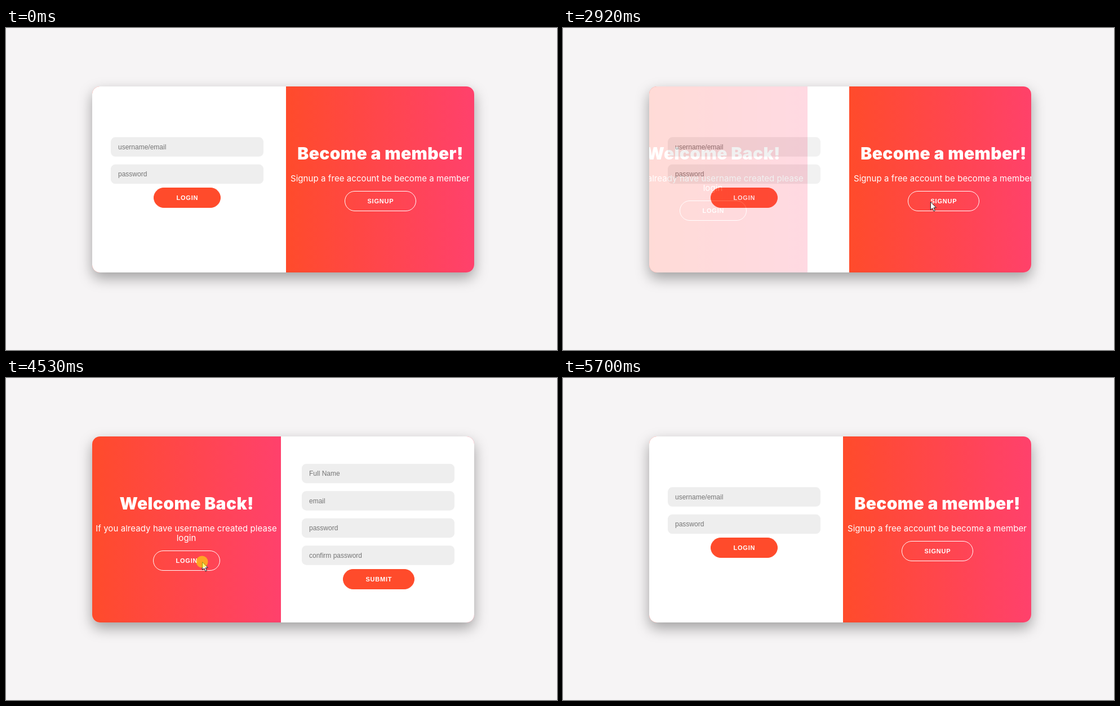
Recreate the animation shown at these times as an HTML page. Size 978x573 px, loop 6230 ms.

```html
<!DOCTYPE html>
<html lang="en">
<head>
<meta charset="utf-8">
<title>Login and signup</title>
<style>
  html, body { margin: 0; width: 100%; height: 100%; overflow: hidden; background: #f6f4f5; }
  .card {
    position: absolute; left: 153px; top: 104px; width: 678px; height: 331px;
    border-radius: 14px; background: #fff;
    box-shadow: 0 10px 25px rgba(0,0,0,.35);
  }
  svg { position: absolute; left: 0; top: 0; display: block; }
  text { fill: #fff; text-anchor: middle; }
  .title { font: 900 30px Inter, sans-serif; letter-spacing: .4px; }
  .info { font: 400 15px Inter, sans-serif; letter-spacing: .07px; }
  .label { font: 700 11px "Liberation Sans", Arial, sans-serif; letter-spacing: .8px; }
  .hint { font: 12px "Liberation Sans", Arial, sans-serif; fill: #757575; text-anchor: start; }
  .button { transform-box: fill-box; transform-origin: center; }
</style>
</head>
<body>
<div class="card"></div>
<svg width="978" height="573" viewBox="0 0 978 573">
  <defs>
    <linearGradient id="warm">
      <stop offset="0" stop-color="#ff4b2b"/>
      <stop offset="1" stop-color="#ff416c"/>
    </linearGradient>
    <clipPath id="frame"><rect x="153" y="104" width="678" height="331" rx="14"/></clipPath>
  </defs>
  <g id="scene" clip-path="url(#frame)"></g>
  <g id="cursor">
    <path d="M.5 .5V14.6L3.7 11.6L6.1 17L8.3 16L6 10.8H10.4Z" fill="#fff" stroke="#222" stroke-width="1"/>
    <circle id="press" r="10.5" fill="#fff000" fill-opacity=".55"/>
  </g>
</svg>
<script>
const LOOP = 6230, SLIDE = 600;
const TO_SIGNUP = 2828, TO_LOGIN = 4750;
const $ = id => document.getElementById(id);

const text = (cls, x, y, s) => `<text class="${cls}" x="${x}" y="${y}">${s}</text>`;

const button = (id, cx, y, w, label, filled) =>
  `<g class="button" id="${id}">
    <rect x="${cx - w / 2 + .5}" y="${y + .5}" width="${w - 1}" height="35" rx="17.5"
      fill="${filled ? '#ff4b2b' : 'none'}" stroke="${filled ? '#ff4b2b' : '#fff'}"/>
    ${text('label', cx + .4, y + 22, label)}
  </g>`;

const inputs = (x, top, hints) => hints.map((hint, i) => {
  const y = top + i * 48.5;
  return `<rect x="${x}" y="${y}" width="271" height="34.5" rx="8" fill="#eee"/>` +
    text('hint', x + 13, y + 21.3, hint);
}).join('');

const panel = (id, x, w, content) =>
  `<g id="${id}"><rect x="${x}" y="104" width="${w}" height="331" fill="url(#warm)"/>${content}</g>`;

const form = (id, x, content) =>
  `<g id="${id}"><rect x="${x}" y="104" width="339" height="331" fill="#fff"/>${content}</g>`;

$('scene').innerHTML =
  panel('leftPanel', 153, 335,
    text('title', 320.7, 233.5, 'Welcome Back!') +
    text('info', 320, 273, 'If you already have username created please') +
    text('info', 320, 290, 'login') +
    button('toLogin', 320.5, 307, 119, 'LOGIN')) +
  panel('rightPanel', 497, 334,
    text('title', 664.5, 233.5, 'Become a member!') +
    text('info', 664, 273, 'Signup a free account be become a member') +
    button('toSignup', 664.5, 290, 127, 'SIGNUP')) +
  form('loginForm', 153,
    inputs(186, 194.3, ['username/email', 'password']) +
    button('login', 321.5, 284, 119, 'LOGIN', true)) +
  form('signupForm', 492,
    inputs(525, 152.7, ['Full Name', 'email', 'password', 'confirm password']) +
    button('submit', 661.5, 340, 127, 'SUBMIT', true));

const clamp = v => Math.min(1, Math.max(0, v));

// CSS "ease": cubic-bezier(.25, .1, .25, 1)
function ease(x) {
  if (x <= 0 || x >= 1) return clamp(x);
  let lo = 0, hi = 1, s;
  for (let i = 0; i < 20; i++) {
    s = (lo + hi) / 2;
    if (.75 * s * (1 - s) + s ** 3 < x) lo = s; else hi = s;
  }
  return .3 * s * (1 - s) ** 2 + 3 * (1 - s) * s * s + s ** 3;
}

// start, end, ease-out power, then start, control and end points
const moves = [
  [150, 800, 1.5, 740, 567, 500, 430, 327, 320],
  [850, 1040, 1.5, 327, 320, 333, 312, 337, 298],
  [1900, 2380, 1.5, 337, 298, 510, 362, 652, 309],
  [3290, 3980, 2.65, 652, 309, 499, 332, 348, 327],
  [5130, 5700, 1, 348, 327, 560, 420, 845, 575]
];

function cursorAt(t) {
  const [a, b, power, x0, y0, cx, cy, x1, y1] = moves.filter(m => t >= m[0]).pop() || moves[0];
  const u = 1 - (1 - clamp((t - a) / (b - a))) ** power, v = 1 - u;
  const mix = (p, q, r) => Math.round(v * v * p + 2 * u * v * q + u * u * r);
  return [mix(x0, cx, x1), mix(y0, cy, y1)];
}

// button, press and release times
const clicks = [['login', 1350, 1510], ['toSignup', 2690, TO_SIGNUP], ['toLogin', 4530, TO_LOGIN]];

function draw(t) {
  const p = ease((t - TO_SIGNUP) / SLIDE) - ease((t - TO_LOGIN) / SLIDE);
  $('leftPanel').setAttribute('transform', `translate(${Math.round(-67 * (1 - p))})`);
  $('rightPanel').setAttribute('transform', `translate(${Math.round(58 * p)})`);
  // each form drops behind its panel once half faded
  $('loginForm').setAttribute('opacity', p <= .5 ? 1 - p : 0);
  $('signupForm').setAttribute('opacity', p > .5 ? p : 0);

  let pressed = false;
  for (const [id, down, up] of clicks) {
    if (t >= down && t < up) pressed = true;
    const depth = clamp((t - down) / 80) - clamp((t - up) / 80);
    $(id).style.transform = `scale(${1 - .05 * depth})`;
  }
  $('press').setAttribute('visibility', pressed ? 'inherit' : 'hidden');
  $('cursor').setAttribute('transform', `translate(${cursorAt(t)})`);
  $('cursor').setAttribute('visibility', t >= 180 && t < 5700 ? 'visible' : 'hidden');
}

const start = performance.now();
function tick() {
  draw((performance.now() - start) % LOOP);
  requestAnimationFrame(tick);
}
tick();
</script>
</body>
</html>
```
